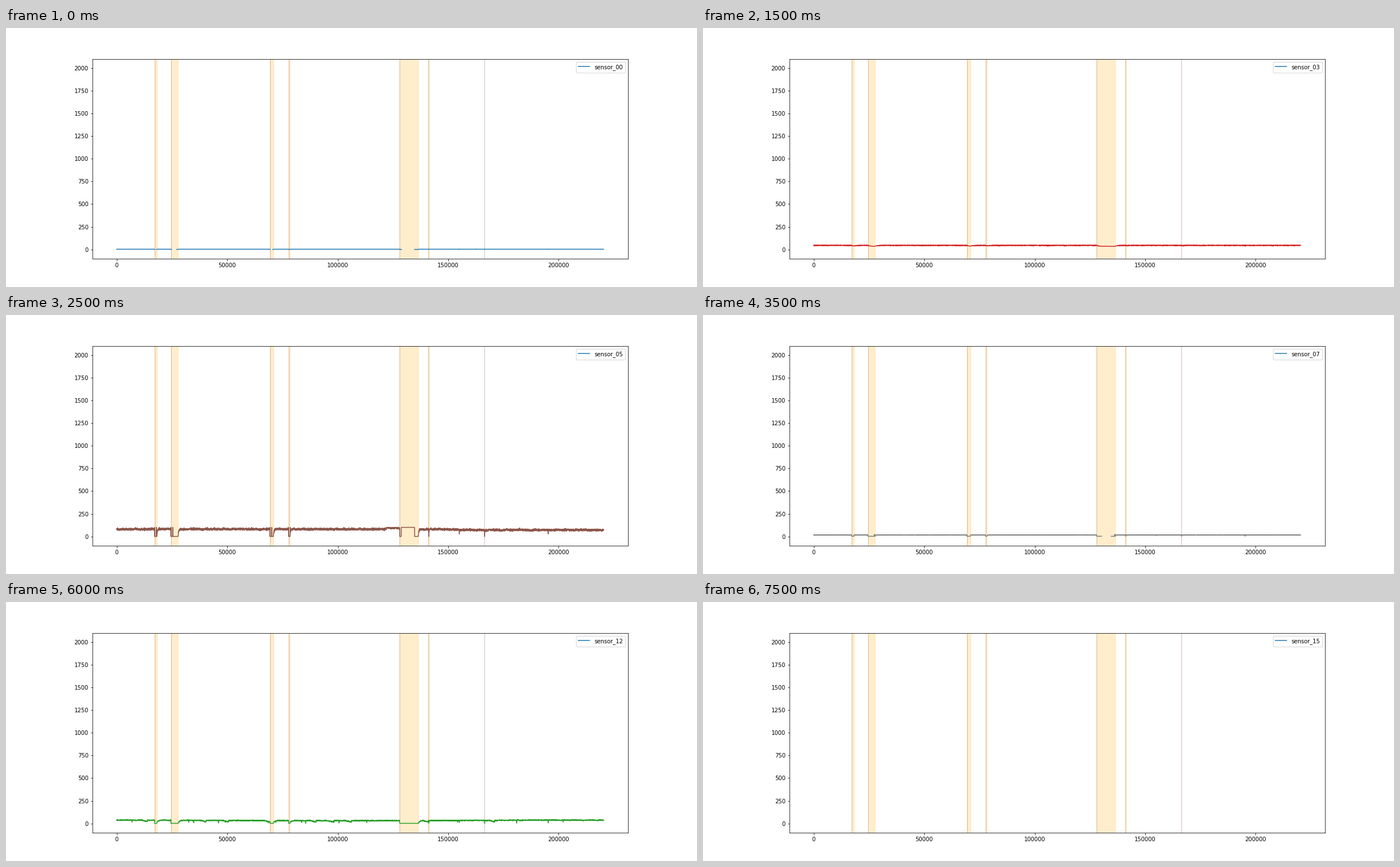
A matplotlib script for the animation above (8000 ms loop, 1222 by 458 pixels).

```python
import numpy as np
import matplotlib.pyplot as plt
from matplotlib.animation import FuncAnimation

W, H, DPI = 1222, 458, 72
ROWS, STEP = 220320, 20
x = np.arange(0, ROWS, STEP)

OUTAGES = [(17155, 18150), (24510, 27780), (69318, 70900), (77790, 78450),
           (128040, 136480), (141131, 141240), (166440, 166520)]
GLITCHES = [155000, 195200]


def between(a, b):
    return (x >= a) & (x <= b)


def lagged(mask, rows):
    """Follow a 0/1 mask with an exponential delay."""
    t = np.arange(0, 6 * rows, STEP)
    kernel = np.exp(-t / rows)
    return np.convolve(mask, kernel / kernel.sum())[:x.size]


def pulse(y, row, value):
    y[between(row, row + 60)] = value


def sensor(seed, level, noise, low, lag=350, sharp=True, drops=6, gap=None):
    """Noisy level that falls to `low` in every outage and in short drops."""
    rng = np.random.default_rng(seed)
    drift = np.convolve(rng.normal(0, noise, x.size), np.ones(60) / 25, "same")
    y = level + rng.normal(0, noise, x.size) + drift

    down = np.any([between(a, b) for a, b in OUTAGES], axis=0).astype(float)
    depth = lagged(down, lag)
    if sharp:
        depth = np.maximum(down, depth)
    y = low + (y - low) * (1 - depth)

    for row in GLITCHES + list(rng.uniform(0, ROWS, drops)):
        m = between(row, row + 60)
        y[m] += (low - y[m]) * rng.uniform(0.5, 1)
    if gap:
        for a, b in OUTAGES:
            if b - a > gap[2]:
                y[between(a + gap[0] * (b - a), a + gap[1] * (b - a))] = np.nan
    return y


def warm(seed, level, low):
    return sensor(seed, level, 0.7, low, lag=900, sharp=False, drops=12)


def flow(seed, level):
    y = sensor(seed, level, 0.5, 2, lag=60, drops=0, gap=(0.27, 0.78, 5000))
    for a, b in OUTAGES[1:5:3]:
        pulse(y, b - 300, 22)
    return y


def vibration():
    """Saturates at 100 before and during the longest outage."""
    level = 75.5 - 4.5 * np.tanh((x - 152000) / 5000) + 16 * between(122000, 127800)
    y = sensor(5, level, 5.5, 0, lag=250, drops=0)
    for a, b in OUTAGES[:4]:
        pulse(y, a + 20, 100)
        pulse(y, a + 800, 100)
    y[between(128720, 134780)] = 100
    return np.clip(y, 0, 100)


def pressure():
    y = sensor(10, 46 + 4 * np.sin((x - 50000) / 35000), 3, 2)
    pulse(y, OUTAGES[1][1] + 200, 75)
    return y


def draining():
    """Sags slowly now and then, then recovers at once."""
    level = 33 + 3 * np.cos(x / 33000)
    for end in 13900, 40400, 50600, 69300, 90200, 98300, 106200, 141000, 171000:
        level -= 16 * between(end - 2500, end) * (x - end + 2500) / 2500
    return sensor(12, level, 2.2, 1, lag=600, drops=16)


def switching():
    level = 3 + 10 * (np.sin(x / 10000) > 0.6)
    return np.clip(sensor(13, level, 1, 0.5), 0, 31)


series = [sensor(0, 2.4, 0.03, 0.1, lag=40, drops=2, gap=(0.1, 0.8, 900)),
          warm(1, 47.5, 40), warm(2, 51, 38), warm(3, 44.5, 35),
          sensor(4, 632, 4, 3, lag=60), vibration(),
          flow(6, 13.5), flow(7, 16.5), flow(8, 15.5), flow(9, 15),
          pressure(), sensor(11, 45 + 3 * np.cos(x / 25000), 3, 1),
          draining(), switching(), sensor(14, 420, 1.5, 33, lag=60, drops=0),
          np.full(x.size, np.nan)]

# the small margin keeps the pixel size from rounding down
fig, ax = plt.subplots(figsize=((W + 0.01) / DPI, (H + 0.01) / DPI), dpi=DPI)
ax.set_xlim(-0.05 * ROWS, 1.05 * ROWS)
ax.set_ylim(-100, 2100)

for a, b in OUTAGES:
    ax.axvline(a, color="#996c7c", alpha=0.45, lw=1, zorder=0.9)
    if b - a > 100:
        ax.axvspan(a, b, color="orange", alpha=0.2)

key, = ax.plot([], [], color="C0", label="sensor_00")
line, = ax.plot([], [])
label = ax.legend(handles=[key], loc="upper right").get_texts()[0]


def update(i):
    line.set_data(x, series[i])
    line.set_color(f"C{i % 10}")
    label.set_text(f"sensor_{i:02d}")
    return line, label


anim = FuncAnimation(fig, update, frames=len(series), interval=500,
                     repeat=True, repeat_delay=0)
plt.show()
```
